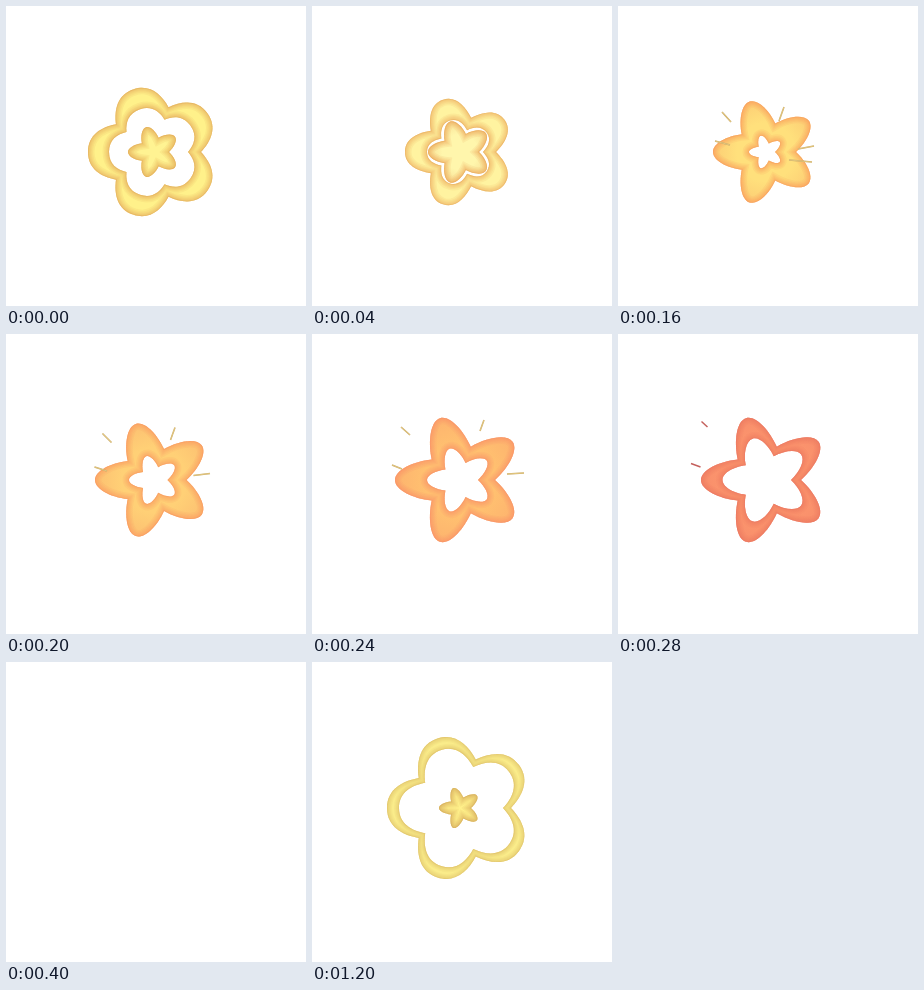
Write an HTML page with a canvas that moves like this. It is 300 by 300 pixels and loops after 1240 ms.

```html
<!DOCTYPE html>
<html lang="en">
<head>
<meta charset="utf-8">
<title>Star burst</title>
<style>
  html, body { margin: 0; width: 100%; height: 100%; overflow: hidden; background: #fff; }
  canvas { display: block; }
</style>
</head>
<body>
<canvas id="stage" width="300" height="300"></canvas>
<script>
const ctx = document.getElementById('stage').getContext('2d');
const STEP = 40, STEPS = 31;
const CENTER = [148, 146];

// step, outer tip, outer valley, hole tip, hole valley, body colour, edge colour
const RING = [
  [-1, 73, 51, 61, 43, '#fff38f', '#d9b765'],
  [0, 66, 47, 45, 34, '#fff18a', '#dda356'],
  [1, 55, 36, 33, 23, '#fff3a0', '#e3a256']
];
const STAR = [
  [-1, 21, 11, 0, 0, '#fff08a', '#cda557'],
  [0, 26, 15, 0, 0, '#fff392', '#dba052'],
  [1, 32, 19, 0, 0, '#fff6ac', '#e39d50'],
  [2, 38, 23, 1.5, 0.6, '#fff9b8', '#e8984e'],
  [4, 53, 30, 17, 9, '#ffe07c', '#f2935a'],
  [6, 65, 35, 33, 18, '#ffc070', '#f58c66'],
  [8, 65, 35, 54, 32, '#fb6e6c', '#d8585c'],
  [9, 65, 35, 61, 34.5, '#ee5c66', '#c94f5c']
];

// first step, then [head x, head y, tail x, tail y] every two steps
const SPARKS = [
  [2, [122, 123, 126, 127], [104, 106, 113, 116], [89, 93, 98, 101], [78, 82, 81, 85]],
  [2, [160, 119, 158, 123], [166, 101, 161, 115], [172, 86, 168, 97]],
  [2, [178, 145, 172, 146], [196, 140, 180, 143], [212, 139, 195, 140]],
  [2, [182, 154, 173, 153], [194, 156, 171, 154]],
  [3, [106, 137, 118, 140], [89, 133, 108, 138], [73, 130, 82, 133], [66, 127, 70, 129]].slice(0, 0),
  [4, [97, 135, 112, 139], [80, 131, 90, 135], [66, 128, 75, 131]]
].filter(spark => spark.length);

const lerp = (a, b, t) => a + (b - a) * t;

function mix(a, b, t) {
  const channel = (hex, i) => parseInt(hex.slice(i, i + 2), 16);
  return '#' + [1, 3, 5].map(i =>
    Math.round(lerp(channel(a, i), channel(b, i), t)).toString(16).padStart(2, '0')).join('');
}

function pose(keys, step) {
  const next = keys.findIndex(key => key[0] >= step);
  if (next < 0) return null;
  const b = keys[next], a = keys[Math.max(0, next - 1)];
  const t = a === b ? 0 : (step - a[0]) / (b[0] - a[0]);
  return a.map((v, i) => typeof v === 'string' ? mix(v, b[i], t) : lerp(v, b[i], t));
}

// Five rounded petals, the first pointing left.
function petals(path, tip, valley, roundness) {
  const u = valley * Math.cos(Math.PI / 5), w = valley * Math.sin(Math.PI / 5);
  const shoulder = lerp(u, tip, 0.52);
  for (let i = 0; i < 5; i++) {
    const angle = Math.PI + i * Math.PI * 0.4;
    const c = Math.cos(angle), s = Math.sin(angle);
    const at = (x, y) => [CENTER[0] + x * c - y * s, CENTER[1] + x * s + y * c];
    if (i === 0) path.moveTo(...at(u, -w));
    path.bezierCurveTo(...at(shoulder, -w * 0.9), ...at(tip, -w * roundness), ...at(tip, 0));
    path.bezierCurveTo(...at(tip, w * roundness), ...at(shoulder, w * 0.9), ...at(u, w));
  }
  path.closePath();
}

function drawBody(keys, step, roundness) {
  const state = pose(keys, step);
  if (!state) return;
  const [, tip, valley, holeTip, holeValley, body, edge] = state;
  const path = new Path2D();
  petals(path, tip, valley, roundness);
  if (holeTip) petals(path, holeTip, holeValley, roundness);

  ctx.save();
  ctx.clip(path, 'evenodd');
  const glow = ctx.createRadialGradient(...CENTER, tip * 0.55, ...CENTER, tip);
  glow.addColorStop(0, body);
  glow.addColorStop(1, mix(body, edge, keys === STAR ? 0.25 : 0));
  ctx.fillStyle = glow;
  ctx.fillRect(0, 0, 300, 300);

  // Layered strokes darken softly towards every edge.
  ctx.strokeStyle = edge;
  ctx.globalAlpha = 0.13;
  for (const width of [13, 10, 7.5, 5.5, 3.5, 2]) {
    ctx.lineWidth = width;
    ctx.stroke(path);
  }
  ctx.globalAlpha = 0.4;
  ctx.lineWidth = 1.4;
  ctx.stroke(path);
  ctx.restore();
}

function drawSpark([start, ...keys], step) {
  const place = (step - start) / 2;
  if (place < 0 || place > keys.length - 1) return;
  const i = Math.floor(place), a = keys[i], b = keys[Math.min(i + 1, keys.length - 1)];
  const [x1, y1, x2, y2] = a.map((v, n) => lerp(v, b[n], place - i));
  const line = (color, width) => {
    ctx.strokeStyle = color;
    ctx.lineWidth = width;
    ctx.beginPath();
    ctx.moveTo(x1, y1);
    ctx.lineTo(x2, y2);
    ctx.stroke();
  };
  line(step < 7 ? '#c5a565' : '#c4605c', step < 3 ? 0.6 : 1.5);
  if (step > 2 && step < 7) line('#f5dc8c', 0.6);
}

function draw(now) {
  const index = Math.floor(now / STEP) % STEPS;
  const step = index === STEPS - 1 ? -1 : index;
  ctx.fillStyle = '#fff';
  ctx.fillRect(0, 0, 300, 300);
  if (step < 10) {
    drawBody(RING, step, 0.62);
    drawBody(STAR, step, 0.48);
    SPARKS.forEach(spark => drawSpark(spark, step));
  }
}

const began = performance.now();
function tick() {
  draw(performance.now() - began);
  requestAnimationFrame(tick);
}
tick();
</script>
</body>
</html>
```
